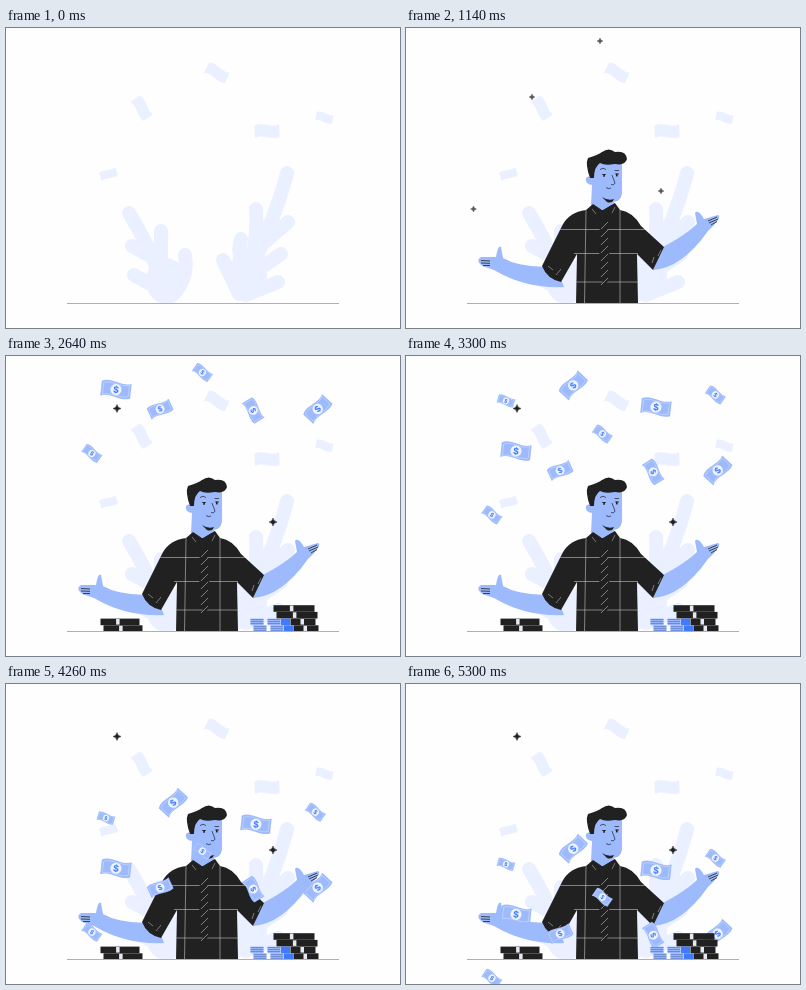
Write an HTML page with a canvas that moves like this. It is 394x300 px and loops after 5380 ms.

```html
<!DOCTYPE html>
<html>
<head>
<meta charset="utf-8">
<style>
html, body { margin: 0; width: 394px; height: 300px; overflow: hidden; background: #fefefe }
canvas { display: block }
</style>
</head>
<body>
<canvas id="stage" width="394" height="300"></canvas>
<script>
const g = document.getElementById('stage').getContext('2d');
const LOOP = 5380, GROUND = 275.5;
const PALE = '#eaf0ff', SKIN = '#9dbafd', DARK = '#212121', BLUE = '#407bff';

const ramp = (t, a, b) => Math.min(1, Math.max(0, (t - a) / (b - a)));
const smooth = u => u * u * (3 - 2 * u);
const easeOut = u => 1 - (1 - u) ** 3;

function group(draw) {
  g.save();
  draw();
  g.restore();
}

function shape(d, color) {
  g.fillStyle = color;
  g.fill(new Path2D(d));
}

function line(d, color, width) {
  g.strokeStyle = color;
  g.lineWidth = width;
  g.stroke(new Path2D(d));
}

function place(x, y, deg, scale, draw) {
  group(() => {
    g.translate(x, y);
    g.rotate(deg * Math.PI / 180);
    g.scale(scale, scale);
    draw();
  });
}

// Draws only above the ground, lowered by the given distance
function rising(depth, draw) {
  group(() => {
    g.beginPath();
    g.rect(0, 0, 394, GROUND);
    g.clip();
    g.translate(0, depth);
    draw();
  });
}

// A leaf is a round body with thick rounded lobes
function leaf(lobes, x, y) {
  rising(0, () => {
    g.lineCap = 'round';
    line(lobes, PALE, 14);
    g.fillStyle = PALE;
    g.beginPath();
    g.ellipse(x, y, 20, 23, 0, 0, 7);
    g.fill();
  });
}

const WAVE = 'M-15-7C-6-12 5-3 15-7L15 8C5 12-6 3-15 8Z';

function scenery() {
  leaf('M123 185Q140 212 155 250M155 203V245M126 218L152 232M128 247L160 265M179 227Q183 252 165 268', 160, 253);
  leaf('M281 145Q270 190 235 262M250 181Q252 205 245 235M282 194L250 222M235 211Q230 225 240 250M275 226L240 250M217 232L233 266M272 254L240 267', 241, 247);
  const paper = () => shape(WAVE, PALE);
  place(211, 44.5, 27, .77, paper);
  place(136, 80, 55, .77, paper);
  place(261, 103, -3, .82, paper);
  place(318.5, 89.5, 12, .57, paper);
  place(102.5, 146, -20, .57, paper);
}

function bill() {
  shape(WAVE, SKIN);
  line('M-13-5.5C-5-9 5-2 13-5.5V6.2C5 9-5 3-13 6.2Z', '#c8d8ff', .7);
  g.fillStyle = '#eef3ff';
  g.beginPath();
  g.arc(0, .3, 5.6, 0, 7);
  g.fill();
  g.fillStyle = BLUE;
  g.font = 'bold 9px Inter, sans-serif';
  g.textAlign = 'center';
  g.textBaseline = 'middle';
  g.fillText('$', 0, .8);
}

// Banknotes sharing a tilt and scale, with their resting places
const bills = [
  { tilt: 35, scale: .64, at: [[86, 294], [196.5, 213], [309.5, 174]] },
  { tilt: 16, scale: .57, at: [[100, 180]] },
  { tilt: 6, scale: 1, at: [[110, 230], [250, 186]] },
  { tilt: -47, scale: .93, at: [[167, 164.5], [311.5, 249.5]] },
  { tilt: -25, scale: .8, at: [[154, 249.5]] },
  { tilt: 58, scale: .8, at: [[247.5, 251]] }
];

function money(t) {
  const drop = 251 * (smooth(ramp(t, 1500, 5300)) - 1);
  g.globalAlpha = ramp(t, 1500, 1800);
  for (const { tilt, scale, at } of bills)
    for (const [x, y] of at) place(x, y + drop, tilt, scale, bill);
  g.globalAlpha = 1;
}

const LEFT_ARM = 'M150 238Q116 241 97 230L95 219Q92 216 90 229L75 229Q69 232 76 238L88 242Q120 261 158 259Z';
const RIGHT_ARM = 'M257 219Q278 208 291 196L289 185Q292 181 298 191L312 187Q317 189 302 203Q276 240 247 242Z';
const SHIRT = 'M180 182L187 176 196 182 209 175 214 182Q227 184 235 198L258 219 247 242 231 226 232 276H170L171 226 155 254Q141 251 136 238L156 198Q163 184 180 182Z';
const FACE = 'M187 135H216V160Q217 173 208 174L209 177 197 182 185 178 186 157Q179 156 180 150Q182 147 187 150Z';
const HAIR = 'M184 150Q179 136 182 130Q192 127 196 124Q203 119 209 124Q220 122 221 131Q219 138 209 136Q199 138 194 135Q188 139 188 150Z';

function arm(d, x, y, turn, fingers) {
  group(() => {
    g.translate(x, y);
    g.rotate(turn);
    g.translate(-x, -y);
    shape(d, SKIN);
    line(fingers, DARK, .8);
  });
}

function man(t) {
  const turn = 1 - easeOut(ramp(t, 200, 1000));
  rising(156 * (1 - easeOut(ramp(t, 100, 640))), () => {
    arm(LEFT_ARM, 150, 246, turn, 'M75 232.5L84 233M75 235L84 235.3M77 237.5H84');
    arm(RIGHT_ARM, 248, 232, -turn, 'M302 193L311 189M303 195L312 191M305 197L311 193.5');
    shape(FACE, SKIN);
    shape(SHIRT, DARK);
    shape('M187 175L197 182L208 175L206 168H188Z', SKIN);
    group(() => {
      g.clip(new Path2D(SHIRT));
      line('M180 182L178.5 276M214 182V276M150 201.5H245M168 225.5H232M168 254H232', '#c4c4c4', .6);
      shape('M194 182H200L205 249L199 257L193 249Z', DARK);
      for (let y = 196; y < 256; y += 8) line(`M195 ${y + 5}L202 ${y - 2}`, '#aaa', .7);
      line('M186 181L190 186M209 179L206 185M142 238L147 242M150 247L155 241M246 235L248 229M252 228L255 222', '#b8b2a0', .6);
    });
    shape(HAIR, DARK);
    shape('M196 169Q202 173 208 171Q206 176 201 174Z', DARK);
    line('M194 141.5Q197 139 200 141.5M208.5 142.5H213M196 146.5H200M209 146H213M206 147L209 155Q208 158 205 156.5M200 159.5Q202 161.5 205 160', DARK, .7);
    g.fillStyle = DARK;
    g.fillRect(197.3, 146, 1.6, 2.8);
    g.fillRect(210, 145.6, 1.6, 2.8);
  });
}

function pack(x, y, w, color) {
  g.fillStyle = color;
  g.fillRect(x, y, w, 6.6);
  if (color === SKIN) {
    for (let k = 0; k < 3; k++) line(`M${x} ${y + 1 + 2 * k}h${w}`, '#5878c4', .8);
  } else if (color === DARK) {
    g.fillStyle = '#e6e9f2';
    g.fillRect(x + w * .4, y + .4, 3.5, 5.6);
  }
}

// Each pile alternates its rows to either side
function pile(t, x, w, color, from = 0) {
  for (let row = from; row < from + 2; row++) {
    const start = 1250 + 130 * row, y = 269.3 - 6.7 * row;
    if (t < start) continue;
    rising((276 - y) * (1 - easeOut(ramp(t, start, start + 450))), () =>
      pack(x + (row % 2 ? -1.5 : 1.5), y, w, color));
  }
}

function piles(t) {
  pile(t, 96, 39, DARK);
  pile(t, 286, 25, DARK);
  pile(t, 269, 41, DARK, 2);
  pile(t, 246, 13, SKIN);
  pile(t, 263, 13, SKIN);
  pile(t, 276.5, 9, BLUE);
}

function sparkle(x, y, level) {
  if (level <= 0) return;
  g.globalAlpha = level;
  place(x, y, 0, level, () => {
    const star = 'M0-4Q.6-.6 4 0Q.6.6 0 4Q-.6.6-4 0Q-.6-.6 0-4Z';
    shape(star, DARK);
    line(star, DARK, .5);
  });
  g.globalAlpha = 1;
}

function sparkles(t) {
  const pulse = mid => 1 - Math.abs(t - mid) / 350;
  for (const [x, y] of [[194, 13], [126, 69], [67.5, 181], [255, 163]]) {
    sparkle(x, y, pulse(1050));
    sparkle(394 - x, y, pulse(1550));
  }
  const stay = ramp(t, 1750, 2200);
  sparkle(111, 52.5, stay);
  sparkle(267, 166, stay);
}

function draw(t) {
  g.fillStyle = '#fefefe';
  g.fillRect(0, 0, 394, 300);
  scenery();
  if (t >= 120) man(t);
  money(t);
  piles(t);
  line(`M61 ${GROUND}H333`, '#b0b0b0', 1.2);
  sparkles(t);
}

const begin = performance.now();
function tick() {
  draw((performance.now() - begin) % LOOP);
  requestAnimationFrame(tick);
}
tick();
</script>
</body>
</html>
```
